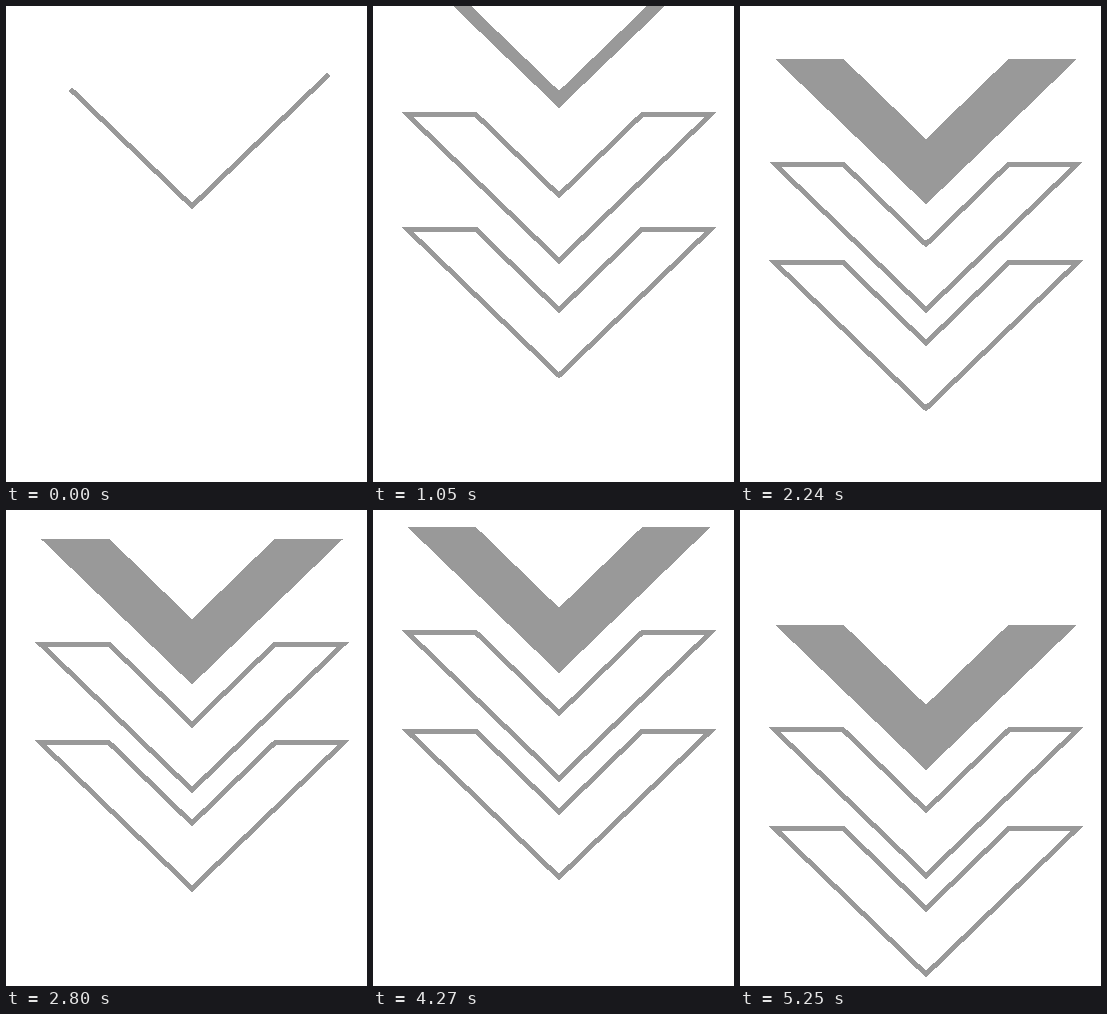
These frames come from a looping animation (361 px wide and 476 px high, 5320 ms). An HTML page:

```html
<!DOCTYPE html>
<html lang="en">
<head>
<meta charset="utf-8">
<title>Falling chevrons</title>
<style>
  html, body { margin: 0; width: 100%; height: 100%; overflow: hidden; background: #fff; }
  svg { display: block; width: 100%; height: 100%; shape-rendering: crispEdges; }
  path { fill: none; stroke: #999; stroke-width: 5; stroke-miterlimit: 10; }
  .solid { fill: #999; stroke: none; }
</style>
</head>
<body>
<svg viewBox="0 0 361 476"></svg>
<script>
const LOOP = 5320, STEP = 70, BOB = 1750, RISE = 840, TRAVEL = 99;
const MID = 186, HALF = 151.2, HEIGHT = 145.7, ARM = 68.5, DEPTH = 65.4;

const svg = document.querySelector('svg');
const chevrons = [
  { y: 318.5, delay: 0 },
  { y: 219.9, delay: 220 },
  { y: 114.5, delay: 525, solid: true },
].map(c => {
  const path = document.createElementNS(svg.namespaceURI, 'path');
  if (c.solid) path.setAttribute('class', 'solid');
  svg.append(path);
  return { ...c, path };
});

const clamp = v => Math.min(1, Math.max(0, v));
const smooth = x => x * x * (3 - 2 * x);

// Shared bob: up for RISE ms, then down for the rest of the period
function bob(t) {
  const p = t % BOB;
  return -TRAVEL * (p < RISE ? smooth(p / RISE) : 1 - smooth((p - RISE) / (BOB - RISE)));
}

// Distance still to fall, easing out
const drop = t => 264 * Math.max(0, 1 - t / 1700) ** 3.5;

// A thin V whose legs grow from the lower tip, then open into a full chevron
function shape(t) {
  const left = clamp(0.804 + t / 300), right = clamp(0.906 + t / 300);
  const open = smooth(clamp((t - 370) / 460));
  const x1 = MID - HALF * left, y1 = HEIGHT * (1 - left);
  const x2 = MID + HALF * right, y2 = HEIGHT * (1 - right);
  const arm = ARM * open;
  return `M${MID} ${HEIGHT - DEPTH * open}L${x2 - arm} ${y2}H${x2}` +
    `L${MID} ${HEIGHT}L${x1} ${y1}H${x1 + arm}Z`;
}

function draw(t) {
  for (const { path, y, delay } of chevrons) {
    path.setAttribute('d', shape(t - delay));
    path.setAttribute('transform', `translate(0 ${y + bob(t) - drop(t - delay)})`);
  }
}

const begin = performance.now();
function tick() {
  const t = (performance.now() - begin) % LOOP;
  draw(Math.floor(t / STEP) * STEP);
  requestAnimationFrame(tick);
}
tick();
</script>
</body>
</html>
```
